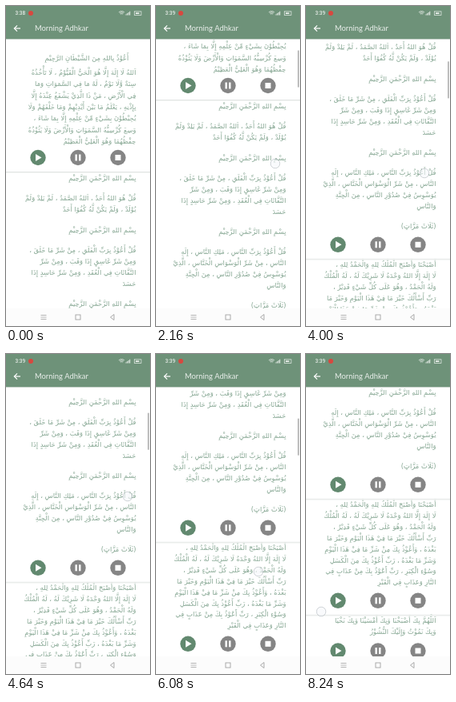
Write an HTML page with a canvas that moves like this. It is 180 px wide and 400 px high and loops after 8.32 s.

```html
<!DOCTYPE html>
<html lang="ar">
<head>
<meta charset="utf-8">
<title>Morning Adhkar</title>
<style>
html, body { margin: 0; width: 100%; height: 100%; overflow: hidden; background: #fff; }
canvas { display: block; width: 180px; height: 400px; }
</style>
</head>
<body>
<canvas id="stage"></canvas>
<script>
const W = 180, H = 400, LOOP = 8320, STEP = 80;
const TOP = 41, BOTTOM = 378, BAR = 47;
const GREEN = '#6e9279', INK = '#86a793', GRAY = '#858585', NAV = '#a2a2a2';
const PALE = 'rgba(255,255,255,0.85)';
const ARABIC = '8.4px "DejaVu Sans", sans-serif';

const canvas = document.getElementById('stage');
const ctx = canvas.getContext('2d');
const ratio = window.devicePixelRatio || 1;
canvas.width = W * ratio;
canvas.height = H * ratio;

const BISMILLAH = 'بِسْمِ اللهِ الرَّحْمَنِ الرَّحِيْمِ';
const REFUGE = 'أَعُوْذُ بِاللهِ مِنَ الشَّيْطَانِ الرَّجِيْمِ';

// Paragraphs: y of the first line, line pitch, lines
const paragraphs = [
  [83, 14.3, [
    'اَللهُ لَا إِلَهَ إِلَّا هُوَ الْحَيُّ الْقَيُّوْمُ ، لَا تَأْخُذُهُ',
    'سِنَةٌ وَّلَا نَوْمٌ ، لَهُ مَا فِي السَّمَوَاتِ وَمَا',
    'فِي الْأَرْضِ ، مَنْ ذَا الَّذِيْ يَشْفَعُ عِنْدَهُ إِلَّا',
    'بِإِذْنِهِ ، يَعْلَمُ مَا بَيْنَ أَيْدِيْهِمْ وَمَا خَلْفَهُمْ وَلَا',
    'يُحِيْطُوْنَ بِشَيْءٍ مِّنْ عِلْمِهِ إِلَّا بِمَا شَاءَ ،',
    'وَسِعَ كُرْسِيُّهُ السَّمَوَاتِ وَالْأَرْضَ وَلَا يَئُوْدُهُ',
    'حِفْظُهُمَا وَهُوَ الْعَلِيُّ الْعَظِيْمُ']],
  [214.5, 14, [BISMILLAH]],
  [240, 14, [
    'قُلْ هُوَ اللهُ أَحَدٌ ، اَللهُ الصَّمَدُ ، لَمْ يَلِدْ وَلَمْ',
    'يُوْلَدْ ، وَلَمْ يَكُنْ لَّهُ كُفُوًا أَحَدٌ']],
  [279.5, 14, [BISMILLAH]],
  [305, 14, [
    'قُلْ أَعُوْذُ بِرَبِّ الْفَلَقِ ، مِنْ شَرِّ مَا خَلَقَ ،',
    'وَمِنْ شَرِّ غَاسِقٍ إِذَا وَقَبَ ، وَمِنْ شَرِّ',
    'النَّفَّاثَاتِ فِي الْعُقَدِ ، وَمِنْ شَرِّ حَاسِدٍ إِذَا',
    'حَسَدَ']],
  [371.5, 14, [BISMILLAH]],
  [397, 14, [
    'قُلْ أَعُوْذُ بِرَبِّ النَّاسِ ، مَلِكِ النَّاسِ ، إِلَهِ',
    'النَّاسِ ، مِنْ شَرِّ الْوَسْوَاسِ الْخَنَّاسِ ، الَّذِيْ',
    'يُوَسْوِسُ فِيْ صُدُوْرِ النَّاسِ ، مِنَ الْجِنَّةِ',
    'وَالنَّاسِ']],
  [463.5, 14, ['(ثَلَاثَ مَرَّاتٍ)']],
  [512, 13.9, [
    'أَصْبَحْنَا وَأَصْبَحَ الْمُلْكُ لِلهِ وَالْحَمْدُ لِلهِ ،',
    'لَا إِلَهَ إِلَّا اللهُ وَحْدَهُ لَا شَرِيْكَ لَهُ ، لَهُ الْمُلْكُ',
    'وَلَهُ الْحَمْدُ ، وَهُوَ عَلَى كُلِّ شَيْءٍ قَدِيْرٌ ،',
    'رَبِّ أَسْأَلُكَ خَيْرَ مَا فِيْ هَذَا الْيَوْمِ وَخَيْرَ مَا',
    'بَعْدَهُ ، وَأَعُوْذُ بِكَ مِنْ شَرِّ مَا فِيْ هَذَا الْيَوْمِ',
    'وَشَرِّ مَا بَعْدَهُ ، رَبِّ أَعُوْذُ بِكَ مِنَ الْكَسَلِ',
    'وَسُوْءِ الْكِبَرِ ، رَبِّ أَعُوْذُ بِكَ مِنْ عَذَابٍ فِي',
    'النَّارِ وَعَذَابٍ فِي الْقَبْرِ']],
  [656.5, 14, [
    'اَللَّهُمَّ بِكَ أَصْبَحْنَا وَبِكَ أَمْسَيْنَا وَبِكَ نَحْيَا',
    'وَبِكَ نَمُوْتُ وَإِلَيْكَ النُّشُوْرُ']]
];
const players = [189.5, 487.3, 632.3, 695];

// Scroll offset over time: [ms, px]
const scrollKeys = [
  [0, 0], [1280, 0], [1680, 43], [2160, 90], [2400, 96], [3280, 96], [4000, 189],
  [4640, 220], [4960, 225], [5280, 225], [6080, 270], [6960, 324], [LOOP, 324]
];

function slope(i) {
  const a = scrollKeys[i - 1], b = scrollKeys[i], c = scrollKeys[i + 1];
  if (!a || !c || a[1] === b[1] || b[1] === c[1]) return 0;
  return (c[1] - a[1]) / (c[0] - a[0]);
}

function scrollAt(t) {
  let i = 0;
  while (i < scrollKeys.length - 2 && t >= scrollKeys[i + 1][0]) i++;
  const [t0, p0] = scrollKeys[i], [t1, p1] = scrollKeys[i + 1];
  const d = t1 - t0, u = (t - t0) / d, v = 1 - u;
  return v * v * (1 + 2 * u) * p0 + u * u * (3 - 2 * u) * p1 +
    d * u * v * (v * slope(i) - u * slope(i + 1));
}

const ramp = (t, a, b) => Math.min(1, Math.max(0, (t - a) / (b - a)));

function touchAt(t, s) {
  if (t >= 1360 && t < 2240) return [149, 287 - s];
  if (t >= 3280 && t < 5040) return [138 + 10 * ramp(t, 3280, 4000) + 4 * ramp(t, 4000, 4640), 398 - s];
  if (t >= 5360 && t < 6800) return [128 + 6 * ramp(t, 6080, 6720), 542 - s];
  if (t >= 7760) return [19, 322];
  return null;
}

function barAlpha(t) {
  if (t < 1360) return 0;
  if (t < 3280) return 1 - ramp(t, 2480, 2960);
  return 1 - ramp(t, 7200, 7840);
}

function rect(x, y, w, h, color) {
  ctx.fillStyle = color;
  ctx.fillRect(x, y, w, h);
}

function frame(x, y, w, h, color, width) {
  ctx.strokeStyle = color;
  ctx.lineWidth = width;
  ctx.strokeRect(x, y, w, h);
}

function disc(x, y, r, color) {
  ctx.fillStyle = color;
  ctx.beginPath();
  ctx.arc(x, y, r, 0, Math.PI * 2);
  ctx.fill();
}

function poly(points, color) {
  ctx.fillStyle = color;
  ctx.beginPath();
  points.forEach(([x, y]) => ctx.lineTo(x, y));
  ctx.fill();
}

function line(points, color, width) {
  ctx.strokeStyle = color;
  ctx.lineWidth = width;
  ctx.beginPath();
  points.forEach(([x, y]) => ctx.lineTo(x, y));
  ctx.stroke();
}

function label(str, x, y, font, color, align, dir) {
  ctx.font = font;
  ctx.fillStyle = color;
  ctx.textAlign = align;
  ctx.direction = dir;
  ctx.fillText(str, x, y);
}

function drawPlayer(y) {
  disc(40, y, 9.7, '#62896f');
  poly([[37, y - 4.5], [44.5, y], [37, y + 4.5]], '#fff');
  disc(90, y, 9.7, GRAY);
  rect(86.5, y - 4, 2.4, 8, '#fff');
  rect(91.1, y - 4, 2.4, 8, '#fff');
  disc(140, y, 9.7, GRAY);
  rect(136.5, y - 3.5, 7, 7, '#fff');
  rect(0, y + 17.5, W, 1, '#e2e5e3');
  rect(0, y + 18.5, W, 1, '#f3f5f4');
}

function drawPage(s) {
  const arabic = (str, x, y, align) => label(str, x, y + 3, ARABIC, INK, align, 'rtl');
  const seen = y => y > TOP - 22 && y < BOTTOM + 22;
  if (seen(65 - s)) arabic(REFUGE, 101, 65 - s, 'center');
  for (const [y0, pitch, lines] of paragraphs) {
    lines.forEach((str, i) => {
      const y = y0 + pitch * i - s;
      if (seen(y)) arabic(str, 162.5, y, 'right');
    });
  }
  players.forEach(y => seen(y - s) && drawPlayer(y - s));
}

function drawWifi(x, y) {
  ctx.strokeStyle = PALE;
  ctx.lineWidth = 0.8;
  [1.8, 3.4, 5].forEach(r => {
    ctx.beginPath();
    ctx.arc(x, y, r, -Math.PI * 0.75, -Math.PI * 0.25);
    ctx.stroke();
  });
}

function drawHeader(t) {
  rect(0, 0, W, TOP, GREEN);
  rect(0, TOP, W, 1, '#c3d0c7');
  label(t < 400 ? '3:38' : '3:39', 11.5, 11.4, '6.5px Roboto, sans-serif', '#fff', 'left', 'ltr');
  disc(31, 9, 3, '#d8483f');
  drawWifi(144.5, 11.5);
  [0, 1, 2, 3].forEach(i => rect(149.5 + i * 1.6, 10.3 - i * 1.2, 1, 1.2 + i * 1.2, PALE));
  frame(160.5, 6.8, 8.5, 4.6, PALE, 0.7);
  rect(162, 8.2, 4.5, 1.8, PALE);
  line([[18, 28], [10.5, 28]], '#fff', 1.2);
  line([[14, 24.3], [10.3, 28], [14, 31.7]], '#fff', 1.2);
  label('Morning Adhkar', 36, 31.2, '9.4px Lato, sans-serif', PALE, 'left', 'ltr');
}

function drawNav() {
  rect(0, BOTTOM, W, H - BOTTOM, '#fcfcfc');
  [386.5, 389, 391.5].forEach(y => rect(43.5, y - 0.4, 7, 0.8, NAV));
  frame(87, 386, 6, 6, NAV, 0.9);
  line([[135, 385.5], [130.5, 389], [135, 392.5], [135, 385.5]], NAV, 0.9);
}

function drawTouch(x, y) {
  disc(x, y, 5.8, 'rgba(245,247,250,0.6)');
  ctx.strokeStyle = 'rgba(130,140,150,0.45)';
  ctx.lineWidth = 0.8;
  ctx.stroke();
}

function draw(t) {
  const s = scrollAt(t), touch = touchAt(t, s);
  ctx.setTransform(ratio, 0, 0, ratio, 0, 0);
  rect(0, 0, W, H, '#fff');
  drawPage(s);
  rect(177, TOP + 2 + s * BAR / (BOTTOM - TOP), 2, BAR - 1, `rgba(110,110,110,${0.45 * barAlpha(t)})`);
  drawHeader(t);
  drawNav();
  if (touch) drawTouch(...touch);
}

const start = performance.now();
function tick() {
  const t = (performance.now() - start) % LOOP;
  draw(Math.floor(t / STEP) * STEP);
  requestAnimationFrame(tick);
}
tick();
</script>
</body>
</html>
```
